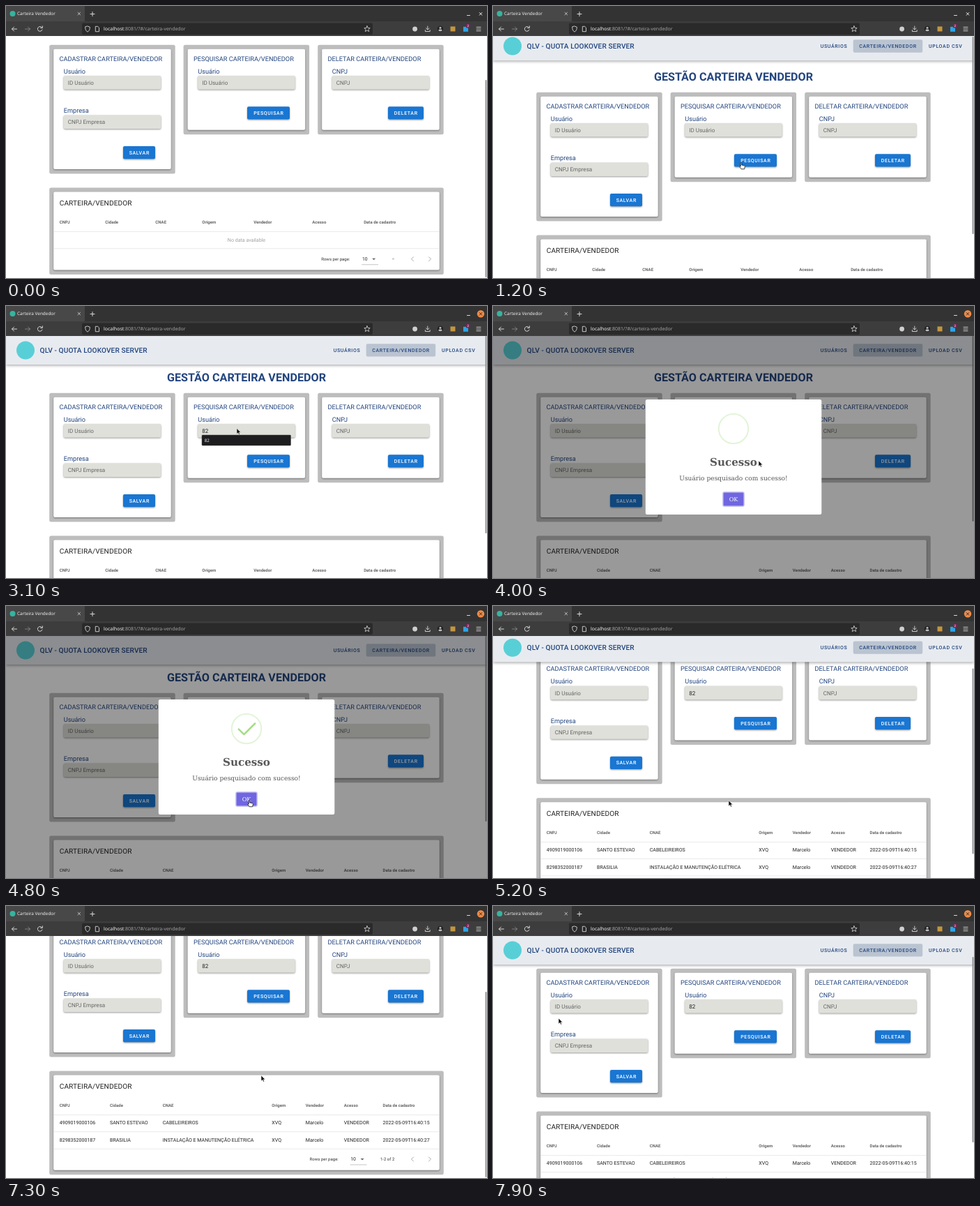
Animation, 690 px wide and 390 px high, one loop 8000 ms. Source, as an HTML page:

```html
<!DOCTYPE html>
<html lang="pt-BR">
<head>
<meta charset="utf-8">
<title>Carteira Vendedor</title>
<style>
  html, body { margin: 0; width: 100%; height: 100%; overflow: hidden; background: #fff; }
  svg { display: block; width: 690px; height: 390px; }
  text { font-family: Roboto, sans-serif; text-rendering: geometricPrecision; white-space: pre; }
  .ui { font-family: "Noto Sans", sans-serif; }
  .serif { font-family: "DejaVu Serif", serif; }
  .raised { filter: drop-shadow(0 1px 1px rgba(0, 0, 0, .4)); }
  .bar { filter: drop-shadow(0 1px 2px rgba(0, 0, 0, .4)); }
  .line { fill: none; stroke: #d8d8d8; stroke-linecap: round; stroke-linejoin: round; }
</style>
</head>
<body>
<svg id="stage" viewBox="0 0 690 390"></svg>
<script>
const LOOP = 8000;
const NAVY = '#23457f', INK = '#222', BLUE = '#1976d2';
const stage = document.getElementById('stage');

function el(parent, tag, attrs = {}) {
  const node = document.createElementNS('http://www.w3.org/2000/svg', tag);
  for (const key in attrs) node.setAttribute(key, attrs[key]);
  parent.append(node);
  return node;
}
const group = parent => el(parent, 'g');
const rect = (parent, x, y, width, height, fill, rx = 0, more) =>
  el(parent, 'rect', { x, y, width, height, fill, rx, ...more });
const circle = (parent, cx, cy, r, fill, more) => el(parent, 'circle', { cx, cy, r, fill, ...more });
const line = (parent, d, width = 1, more) =>
  el(parent, 'path', { d, class: 'line', 'stroke-width': width, ...more });

// y is the middle of the capitals
function text(parent, string, x, y, size, fill, more) {
  const node = el(parent, 'text', { x, y: y + size * .355, 'font-size': size, fill, ...more });
  node.textContent = string;
  return node;
}
const BUTTON_TEXT = { 'font-weight': 500, 'letter-spacing': .63 };
const MIDDLE = { 'text-anchor': 'middle' };

// ---------- page ----------
rect(stage, 0, 0, 690, 390, '#fff');
const page = group(stage);
text(page, 'GESTÃO CARTEIRA VENDEDOR', 345, 102.3, 16.16, NAVY, { ...MIDDLE, 'font-weight': 700 });

function panel(parent, x, y, width, height) {
  rect(parent, x, y, width, height, '#bdbdbd', 2.5);
  rect(parent, x + 6, y + 6, width - 12, height - 12.5, '#fff', 2, { class: 'raised' });
}
function field(x, y, label, hint) {
  text(page, label, x, y - 6.7, 9.2, NAVY);
  rect(page, x, y, 139.5, 19.4, '#dfe0da', 2, { class: 'raised' });
  return text(page, hint, x + 6, y + 10, 8.08, '#666');
}
function button(x, y, width, label) {
  rect(page, x, y, width, 18.3, BLUE, 2, { class: 'raised' });
  text(page, label, x + width / 2 + .3, y + 9.1, 7.07, '#fff', { ...MIDDLE, ...BUTTON_TEXT });
}
function card(x, height, title) {
  panel(page, x, 124.8, 180.5, height);
  text(page, title, x + 14.3, 144.4, 9.22, NAVY);
}
card(62.2, 184.7, 'CADASTRAR CARTEIRA/VENDEDOR');
card(254.6, 128.4, 'PESQUISAR CARTEIRA/VENDEDOR');
card(447.2, 128.4, 'DELETAR CARTEIRA/VENDEDOR');
field(82.7, 169, 'Usuário', 'ID Usuário');
field(82.7, 225.6, 'Empresa', 'CNPJ Empresa');
const searchHint = field(275.2, 169, 'Usuário', 'ID Usuário');
field(467.7, 169, 'CNPJ', 'CNPJ');
button(168, 270, 46, 'SALVAR');
button(346, 213.2, 61, 'PESQUISAR');
button(548, 213.2, 51, 'DELETAR');
const typed = text(page, '', 281.2, 179, 8.08, INK);
const caret = rect(page, 281, 174, .6, 10, INK);

const HEADINGS = ['CNPJ', 'Cidade', 'CNAE', 'Origem', 'Vendedor', 'Acesso', 'Data de cadastro'];
const ROW_TOP = 392.3, ROW_HEIGHT = 24.3;

function table(height, columns, footerX, range) {
  const g = group(page);
  panel(g, 62.2, 329.5, 565.6, height);
  text(g, 'CARTEIRA/VENDEDOR', 76.7, 351.7, 10.1, INK, { 'letter-spacing': .12 });
  HEADINGS.forEach((name, i) =>
    text(g, name, columns[i], 379.2, 6.06, '#666', { 'font-weight': 700 }));
  const y = 329.5 + height - 22.2;
  text(g, 'Rows per page:', footerX, y, 6.06, '#333');
  text(g, '10', footerX + 58.7, y, 6.8, INK);
  line(g, `M${footerX + 58.5} ${y + 8}h23`, .5, { stroke: '#888', style: 'stroke:#888' });
  el(g, 'path', { d: `M${footerX + 73} ${y - 1}h5l-2.5 2.5z`, fill: '#666' });
  text(g, range, footerX + 101.3, y, 6.06, '#333');
  for (const [x, side] of [[583, 1], [608, -1]])
    line(g, `M${x + side * 1.5} ${y - 3}l${-side * 3} 3l${side * 3} 3`, 1, { style: 'stroke:#aaa' });
  return g;
}
const rule = (g, i) => rect(g, 68.5, ROW_TOP + i * ROW_HEIGHT, 553, .5, '#d5d5d5');

const emptyTable = table(124.5, [76.7, 142.2, 214.3, 281.3, 355.2, 439.2, 513.2], 452.2, '–');
text(emptyTable, 'No data available', 345, 404.4, 7.07, '#a0a0a0', MIDDLE);
rule(emptyTable, 0);
rule(emptyTable, 1);

const columns = [76.7, 149, 224.7, 381.3, 429.8, 484.8, 540.6];
const fullTable = table(148.7, columns, 435.6, '1-2 of 2');
const rowMarks = [
  ['4909019000106', 'SANTO ESTEVAO', 'CABELEIREIROS', 'XVQ', 'Marcelo', 'VENDEDOR', '2022-05-09T16:40:15'],
  ['8298352000187', 'BRASILIA', 'INSTALAÇÃO E MANUTENÇÃO ELÉTRICA', 'XVQ', 'Marcelo', 'VENDEDOR', '2022-05-09T16:40:27'],
].map((cells, row) => {
  const top = ROW_TOP + row * ROW_HEIGHT;
  const mark = rect(fullTable, 68.5, top, 553, ROW_HEIGHT, '#eee');
  cells.forEach((cell, i) => text(fullTable, cell, columns[i], top + 11.6, 7.07, INK));
  rule(fullTable, row);
  return mark;
});
rule(fullTable, 2);

const popup = group(stage);
rect(popup, 281, 185, 127.5, 15, '#1d1d20', 1, { stroke: '#444', 'stroke-width': .5 });
text(popup, '82', 284.8, 192.3, 6.2, '#eee', { class: 'ui' });

// ---------- app bar ----------
const appBar = group(stage);
rect(appBar, 0, 40, 690, 44, '#e7ebf0', 0, { class: 'bar' });
circle(appBar, 28, 63.5, 13, '#58cfd6');
text(appBar, 'QLV - QUOTA LOOKOVER SERVER', 48.6, 63.5, 10.1, NAVY, { 'font-weight': 500, 'letter-spacing': .12 });
rect(appBar, 516.7, 54.3, 99.5, 18.3, '#bac4d1', 2);
[['USUÁRIOS', 469.7], ['CARTEIRA/VENDEDOR', 525.2], ['UPLOAD CSV', 625]].forEach(([label, x]) =>
  text(appBar, label, x, 63.5, 7.07, NAVY, BUTTON_TEXT));

const thumb = rect(stage, 687.6, 43, 1.8, 283, '#8c8c8c', 1);

// ---------- dialog ----------
const backdrop = rect(stage, 0, 43, 690, 347, '#000');
const dialog = group(stage);
rect(dialog, 218.8, 134, 252.5, 165, '#fff', 2.5);
circle(dialog, 345, 176, 21.2, 'none', { stroke: '#a5dc86', 'stroke-opacity': .32, 'stroke-width': 2 });
const check = line(dialog, 'M333.8 176.6l7.6 7.5l15.8-15.6', 2.5, {
  pathLength: 1, style: 'stroke:#a5dc86', 'stroke-dasharray': '1 2' });
text(dialog, 'Sucesso', 345, 223.7, 15.15, '#595959', { ...MIDDLE, class: 'serif', 'font-weight': 700 });
text(dialog, 'Usuário pesquisado com sucesso!', 345, 247, 9.1, '#545454', { ...MIDDLE, class: 'serif' });
rect(dialog, 330, 267, 30, 20, '#7066e0', 2, { stroke: '#b7b2ef', 'stroke-width': 1.5 });
text(dialog, 'OK', 345, 277, 8.08, '#fff', { ...MIDDLE, class: 'serif' });

// ---------- browser ----------
rect(stage, 0, 0, 690, 22, '#333');
rect(stage, 0, 0, 113, 22, '#484848');
rect(stage, 0, 22, 690, 21, '#3d3d3d');
rect(stage, 109, 24.5, 417, 16.5, '#2a2a2a', 2);
circle(stage, 9.5, 11, 4, '#35b5a0');
text(stage, 'Carteira Vendedor', 16, 11, 6.4, '#eee', { class: 'ui' });
line(stage, 'M103 9.2l3.6 3.6m0-3.6l-3.6 3.6', .8);
line(stage, 'M121 11.5h6m-3-3v6');
line(stage, 'M661.5 13.5h4');
const closeDisc = circle(stage, 681, 11.3, 5.2, '#f08a45');
const closeMark = line(stage, 'M679.2 9.5l3.6 3.6m0-3.6l-3.6 3.6');
line(stage, 'M15.5 33h-7m3-3l-3 3l3 3');
line(stage, 'M27.5 33h7m-3-3l3 3l-3 3', 1, { opacity: .4 });
line(stage, 'M51.6 31a3.4 3.4 0 1 0 .4 3M52.3 28.8v2.6h-2.6');
line(stage, 'M117 29l3.3 1.2c0 3.5-.8 5.5-3.3 6.9c-2.5-1.4-3.3-3.4-3.3-6.9z', .9);
line(stage, 'M128.7 29.3h3l1.8 1.8v5.6h-4.8z', .9);
text(stage, 'localhost', 140, 32.7, 6.92, '#f4f4f4', { class: 'ui' })
  .insertAdjacentHTML('beforeend', '<tspan fill="#a2a2a2">:8081/?#/carteira-vendedor</tspan>');
line(stage, 'M518 28.6l1.2 2.8l3 .2l-2.3 2l.8 3l-2.7-1.7l-2.7 1.7l.8-3l-2.3-2l3-.2z', .8);
circle(stage, 586.6, 33, 3.4, '#cfcfcf');
line(stage, 'M604.8 29v4.8m-2.2-2l2.2 2.2l2.2-2.2M601.4 34.5v2h6.8v-2', .9);
circle(stage, 623, 33, 4.2, '#202020');
circle(stage, 623, 31.3, 1.5, '#bbb');
rect(stage, 620.4, 33.4, 5.2, 2.8, '#bbb', 1.4);
rect(stage, 637.5, 29.4, 7, 7, '#c4963f');
rect(stage, 656, 29.8, 7, 7, '#2ba5e8');
rect(stage, 660, 25.6, 5.5, 6, '#7a2458', 1);
text(stage, '2', 662.8, 28.6, 4.6, '#fff', MIDDLE);
line(stage, 'M675 30.3h6m-6 2.7h6m-6 2.7h6', .9);

// ---------- pointers ----------
const pointer = group(stage);
const arrow = el(pointer, 'path', {
  d: 'M0 0v8l1.9-1.7l1.3 2.8l1.3-.6l-1.2-2.7h2.5z', fill: '#111', stroke: '#fff', 'stroke-width': .5 });
const hand = el(pointer, 'path', {
  d: 'M-.8 .6q.8-1 1.6 0v3.4l3.8 .8q.9 .4 .7 1.6l-.6 3.4h-4.6l-2.6-3.6q.2-1.2 1.7 0z',
  fill: '#fff', stroke: '#111', 'stroke-width': .8 });
const beam = line(pointer, 'M-1.5-4h3m-1.5 0v8m-1.5 0h3', .8, { style: 'stroke:#222' });

// ---------- motion ----------
const smooth = p => p * p * (3 - 2 * p);

function track(t, keys, ease = p => p) {
  const next = keys.findIndex(key => key[0] > t);
  if (next === 0) return keys[0].slice(1);
  if (next < 0) return keys[keys.length - 1].slice(1);
  const from = keys[next - 1], to = keys[next];
  const p = ease((t - from[0]) / (to[0] - from[0]));
  return from.slice(1).map((value, i) => value + (to[i + 1] - value) * p);
}

const SCROLL = [[700, 69], [1200, 1], [1280, 0], [5050, 0], [5200, 54], [5420, 93], [7380, 93], [7800, 35]];
const BAR_SHIFT = [[960, -50], [1200, -6], [1290, 0], [5170, 0], [5200, -3.5], [5380, -50], [7420, -50], [7680, 0]];
const POINTER = [
  [200, 692, 290], [500, 562, 135], [700, 562, 135], [1100, 356, 224], [1300, 356, 224], [1600, 336, 177],
  [2900, 336, 177], [3050, 331, 175.5], [3200, 331, 175.5], [3650, 381, 222], [4250, 381, 222],
  [4700, 349, 278], [4900, 349, 278], [5150, 338, 279], [5750, 338, 279], [6100, 342, 308],
  [6500, 354, 334], [6700, 360, 312], [7050, 366, 243], [7300, 366, 243], [7900, 94, 161]];
const BACKDROP = [[3920, 0], [4000, .4], [4850, .4], [4980, 0]];
const DIALOG = [[3920, .7, 0], [4000, 1, 1], [4850, 1, 1], [4980, .5, 0]];
const CHECK = [[4350, 0], [4620, 1]];

const show = (node, on) => node.setAttribute('display', on ? 'inline' : 'none');
const move = (node, x, y) => node.setAttribute('transform', `translate(${x} ${y})`);

function draw(t) {
  const [scroll] = track(t, SCROLL);
  const [x, y] = track(t, POINTER, smooth);
  const loaded = t >= 3850;
  const focused = t >= 1600;

  move(page, 0, -scroll);
  move(appBar, 0, track(t, BAR_SHIFT)[0]);
  show(emptyTable, !loaded);
  show(fullTable, loaded);
  const length = loaded ? 266 : 283;
  thumb.setAttribute('height', length);
  thumb.setAttribute('y', 43 + scroll * (346 - length) / (loaded ? 93 : 69));

  typed.textContent = t < 2600 ? '' : t < 2800 ? '8' : '82';
  show(searchHint, t < 2600);
  show(caret, t >= 1800 && t < 2600);
  show(popup, t >= 2600 && t < 3300);
  show(closeDisc, focused);
  closeMark.style.stroke = focused ? '#333' : '#eee';

  const [scale, opacity] = track(t, DIALOG);
  backdrop.setAttribute('opacity', track(t, BACKDROP)[0]);
  dialog.setAttribute('opacity', opacity);
  dialog.setAttribute('transform', `translate(345 216.5) scale(${scale}) translate(-345 -216.5)`);
  const [drawn] = track(t, CHECK);
  check.setAttribute('stroke-dasharray', `${drawn} 2`);
  show(check, drawn > 0);

  rowMarks.forEach((mark, i) => {
    const depth = y + scroll - ROW_TOP - i * ROW_HEIGHT;
    show(mark, t > 5000 && x > 69 && depth >= 0 && depth < ROW_HEIGHT);
  });

  const overInput = t >= 1500 && t < 3000;
  const overButton = t >= 1050 && t < 1400 || t >= 3600 && t < 3920 || t >= 4680 && t < 4900;
  move(pointer, x, y);
  show(beam, overInput);
  show(hand, overButton);
  show(arrow, !overInput && !overButton);
}

function tick() {
  draw(performance.now() % LOOP);
  requestAnimationFrame(tick);
}
tick();
</script>
</body>
</html>
```
